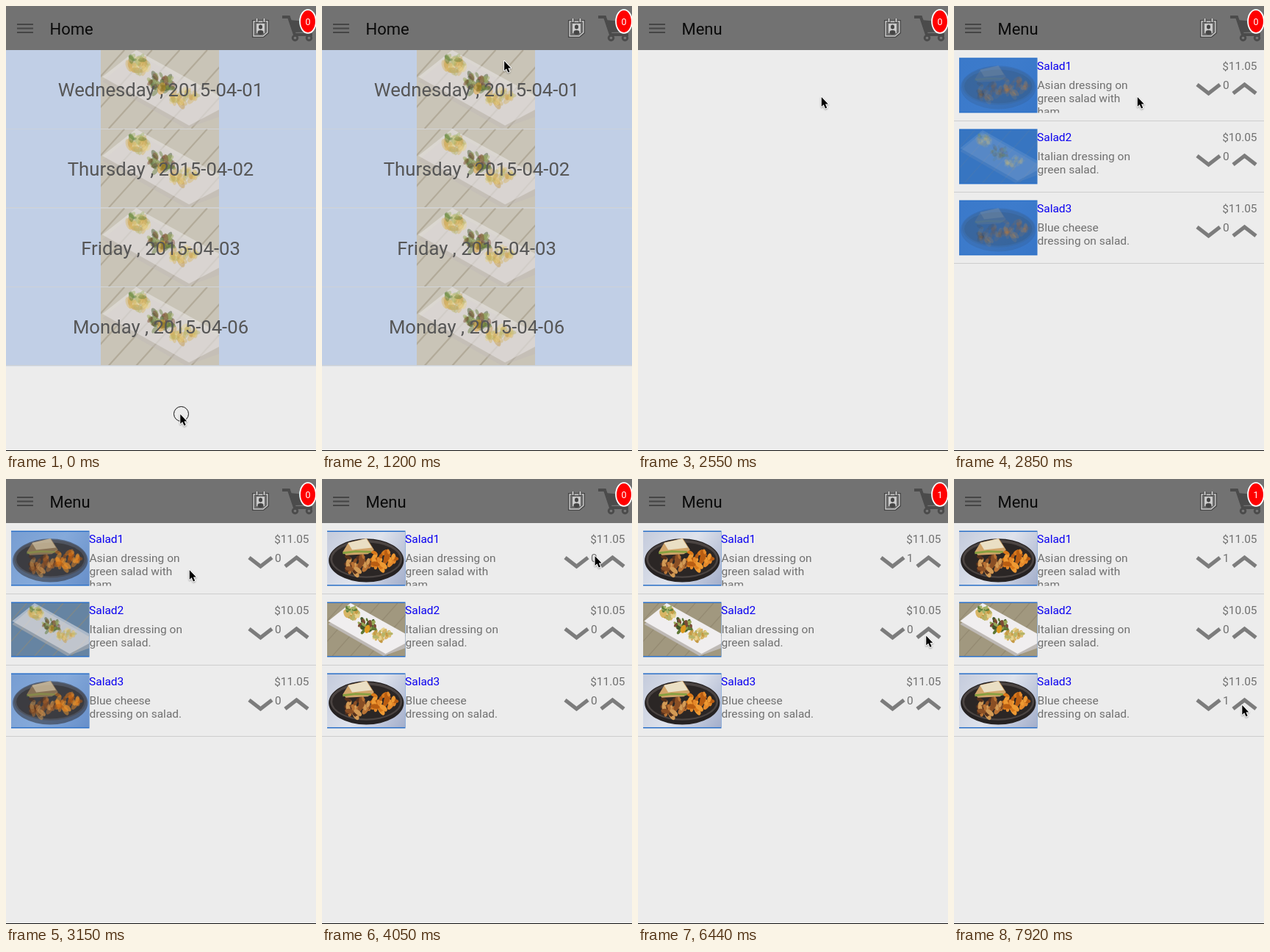
These frames come from a looping animation (422x606 px, 8 s). An HTML page with a canvas:

```html
<!DOCTYPE html>
<html lang="en">
<head>
<meta charset="utf-8">
<title>Menu ordering</title>
<style>
  html, body { margin: 0; height: 100%; overflow: hidden; background: #ececec; }
  canvas { display: block; }
</style>
</head>
<body>
<canvas id="stage" width="422" height="606"></canvas>
<script>
const c = document.getElementById('stage').getContext('2d');
const LOOP = 8000, STEP = 147;
const GREY = '#707070';

// Pointer moves, drawn in discrete steps
const START = { x: 236.5, y: 555.5 };
const MOVES = [
  { at: 900, steps: 5, x: 249, y: 123.5, overshoot: 1.85, bend: 0 },
  { at: 3750, steps: 5, x: 389.5, y: 106.5, overshoot: 1.85, bend: 0 },
  { at: 5850, steps: 5, x: 391.5, y: 213, overshoot: 0, bend: -6 },
  { at: 6740, steps: 7, x: 391.5, y: 307.5, overshoot: 0, bend: 0 }
];
const CLICKS = [0, 2250, 4650, 7770];

const DAYS = ['Wednesday , 2015-04-01', 'Thursday , 2015-04-02', 'Friday , 2015-04-03', 'Monday , 2015-04-06'];
const DISHES = [
  { name: 'Salad1', price: '$11.05', lines: ['Asian dressing on', 'green salad with', 'ham'], paint: sandwich, ordered: 4800 },
  { name: 'Salad2', price: '$10.05', lines: ['Italian dressing on', 'green salad.'], paint: quiche, ordered: Infinity },
  { name: 'Salad3', price: '$11.05', lines: ['Blue cheese', 'dressing on salad.'], paint: sandwich, ordered: 7920 }
];

const easeOut = (k, power) => 1 - (1 - k) ** power;
const easeBack = (k, s) => 1 + (s + 1) * (k - 1) ** 3 + s * (k - 1) ** 2;

function seeded(seed) {
  return () => {
    const v = Math.sin(seed++ * 127.1) * 43758.5;
    return v - Math.floor(v);
  };
}

function rect(x, y, w, h, color) {
  c.fillStyle = color;
  c.fillRect(x, y, w, h);
}

function text(s, x, y, size, color, align = 'left') {
  c.font = `${size}px Roboto, sans-serif`;
  c.textAlign = align;
  c.fillStyle = color;
  c.fillText(s, x, y);
}

function trace(points, closed) {
  c.beginPath();
  points.forEach(([x, y]) => c.lineTo(x, y));
  if (closed) c.closePath();
}

function line(points, color, width, closed) {
  trace(points, closed);
  c.strokeStyle = color;
  c.lineWidth = width;
  c.stroke();
}

function poly(points, color) {
  trace(points, true);
  c.fillStyle = color;
  c.fill();
}

function oval(x, y, rx, ry, color, turn = 0) {
  c.beginPath();
  c.ellipse(x, y, rx, ry, turn, 0, 7);
  c.fillStyle = color;
  c.fill();
}

// A heap of small ovals inside an ellipse
function heap(seed, count, x, y, rx, ry, size, colors) {
  const rnd = seeded(seed);
  for (let i = 0; i < count; i++) {
    const angle = rnd() * 7, reach = Math.sqrt(rnd()), s = size * (.6 + rnd() * .7);
    oval(x + Math.cos(angle) * reach * rx, y + Math.sin(angle) * reach * ry,
      s, s * .5, colors[i % colors.length], rnd() * 3);
  }
}

// Photos are painted on a 150 x 100 board
function photo(paint, x, y, w, h, alpha) {
  c.save();
  c.beginPath();
  c.rect(x, y, w, h);
  c.clip();
  c.globalAlpha = alpha;
  c.translate(x, y);
  c.scale(w / 150, h / 100);
  paint();
  c.restore();
}

function quiche() {
  rect(0, 0, 150, 100, '#a1987f');
  for (let x = -60; x < 150; x += 35) line([[x, 100], [x + 90, 0]], '#958b73', 2);
  poly([[2, 40], [45, 4], [150, 64], [150, 85], [108, 100]], '#beb9b5');
  poly([[2, 34], [45, 0], [150, 58], [150, 76], [112, 96]], '#f0eeef');
  const egg = ['#d8b565', '#e6d28e', '#c59a45', '#b8b468'];
  heap(3, 30, 48, 21, 13, 10, 6, egg);
  heap(8, 30, 104, 58, 17, 11, 6, egg);
  heap(5, 10, 46, 11, 9, 4, 5, ['#61803c', '#a3b36a']);
  heap(21, 34, 76, 43, 16, 13, 6, ['#5f7835', '#3f5528', '#96a655', '#7c4a36']);
  oval(77, 49, 5, 8, '#dd9a20', .3);
}

function sandwich() {
  const cloth = c.createLinearGradient(0, 0, 150, 100);
  cloth.addColorStop(0, '#c4cbdc');
  cloth.addColorStop(.5, '#dfe3ec');
  cloth.addColorStop(1, '#a3aecb');
  rect(0, 0, 150, 100, cloth);
  oval(75, 54, 72, 41, '#262222');
  oval(75, 51, 69, 36, '#4b4442');
  oval(75, 52, 65, 32, '#2b2625');
  heap(4, 36, 58, 60, 24, 18, 8, ['#8a4f25', '#b97234', '#55301c', '#d29a55']);
  heap(12, 34, 107, 51, 23, 18, 8, ['#d9781b', '#ee9a33', '#b95d12', '#e5892a']);
  poly([[30, 38], [41, 20], [76, 12], [90, 34], [78, 42], [36, 44]], '#d2a56a');
  poly([[40, 21], [75, 13], [86, 30], [48, 34]], '#eadfc4');
  line([[30, 40], [55, 37], [84, 38]], '#86a040', 4);
}

function header(title, count) {
  const dark = '#454545', light = '#cbcbcb';
  rect(0, 0, 422, 60, '#727272');
  for (const y of [24, 29.5, 35]) rect(15, y, 22, 2, dark);
  text(title, 59.5, 39, 22, '#0a0a0a');

  // Calendar
  const page = [[337, 21], [356, 21], [356, 36], [350, 41], [337, 41]];
  line(page, dark, 4, true);
  poly(page, '#6a6a6a');
  line(page, light, 1.4, true);
  rect(341, 24, 11, 13, light);
  oval(346.5, 28.5, 2.5, 3, dark);
  oval(346.5, 36, 4, 3, dark);
  for (const x of [341, 351]) {
    rect(x - 1.5, 17, 4, 6, dark);
    rect(x - .5, 17, 2, 5, light);
  }

  // Cart
  const metal = '#4b4b4b';
  line([[376, 15], [385, 15], [393, 39], [417, 39]], metal, 4);
  poly([[386, 19], [419, 22], [415, 35], [391, 36]], metal);
  for (const x of [393.5, 412.5]) {
    oval(x, 43.5, 4.7, 4.7, metal);
    oval(x, 43.5, 1.8, 1.8, '#777');
  }

  oval(411, 21, 11.8, 16.8, '#fff');
  oval(411, 21, 10, 15, '#f00');
  text(count, 411, 25.5, 12.5, '#fff', 'center');
}

function home(pressed) {
  DAYS.forEach((day, i) => {
    const y = 60 + i * 107.6;
    rect(0, y, 422, 107.6, pressed && i === 0 ? '#b2c1d9' : '#c1cfe6');
    rect(129, y, 161, 107, '#ebe8e4');
    photo(quiche, 129, y, 161, 107, .45);
    rect(0, Math.round(y + 106.6), 422, 1, '#cfd1d3');
    text(day, 210.5, y + 63.3, 25.7, '#565656', 'center');
  });
}

function menu(t) {
  const shown = t < 3150 ? .1 : t < 3300 ? .5 : 1;
  DISHES.forEach((dish, i) => {
    c.save();
    c.translate(0, i * 97);
    rect(7, 70.5, 106.5, 75, '#2b70c8');
    photo(dish.paint, 7, 72, 106.5, 72, shown);
    text(dish.name, 113, 87, 15.5, '#0a00f0');
    text(dish.price, 412.5, 87, 15.4, GREY, 'right');
    text(t < dish.ordered ? '0' : '1', 366, 112.5, 15.4, GREY);
    for (const [x, tip] of [[346.5, 6], [395.5, -6]]) {
      line([[x - 15.5, 113 - tip], [x, 113 + tip], [x + 15.5, 113 - tip]], '#7c7c7c', 5.3);
    }
    rect(0, 156, 422, 1, '#cecece');
    c.beginPath();
    c.rect(113, 95, 200, 50.5);
    c.clip();
    dish.lines.forEach((s, k) => text(s, 113.5, 112.5 + k * 18, 15.5, GREY));
    c.restore();
  });
}

function pointerAt(t) {
  let { x, y } = START;
  for (const m of MOVES) {
    if (t < m.at) break;
    const k = Math.min(1, (Math.floor((t - m.at) / STEP) + 1) / m.steps);
    x += (m.x - x) * easeOut(k, 2.2) + m.bend * Math.sin(Math.PI * k);
    y += (m.y - y) * easeBack(k, m.overshoot);
  }
  return [x, y];
}

function pointer(t) {
  c.save();
  c.translate(...pointerAt(t));
  if (CLICKS.some(k => t >= k && t < k + 150)) {
    c.beginPath();
    c.arc(2, 0, 10, 0, 7);
    c.strokeStyle = '#111';
    c.lineWidth = 1;
    c.stroke();
  }
  const arrow = [[.8, .5], [.8, 13.5], [3.7, 10.8], [6, 16], [8.2, 15], [6, 10], [9.8, 10]];
  c.lineJoin = 'round';
  c.shadowColor = 'rgba(0,0,0,.35)';
  c.shadowBlur = 2;
  c.shadowOffsetY = 1;
  line(arrow, '#fff', 2, true);
  c.shadowColor = 'transparent';
  poly(arrow, '#000');
  c.restore();
}

function draw(now) {
  const t = now % LOOP;
  rect(0, 0, 422, 606, '#ececec');
  if (t < 2550) home(t >= 2400);
  else if (t >= 2850) menu(t);
  header(t < 2550 ? 'Home' : 'Menu', t < 5100 ? '0' : '1');
  rect(0, 605, 422, 1, '#111');
  pointer(t);
}

const start = performance.now();
function tick() {
  draw(performance.now() - start);
  requestAnimationFrame(tick);
}
tick();
</script>
</body>
</html>
```
